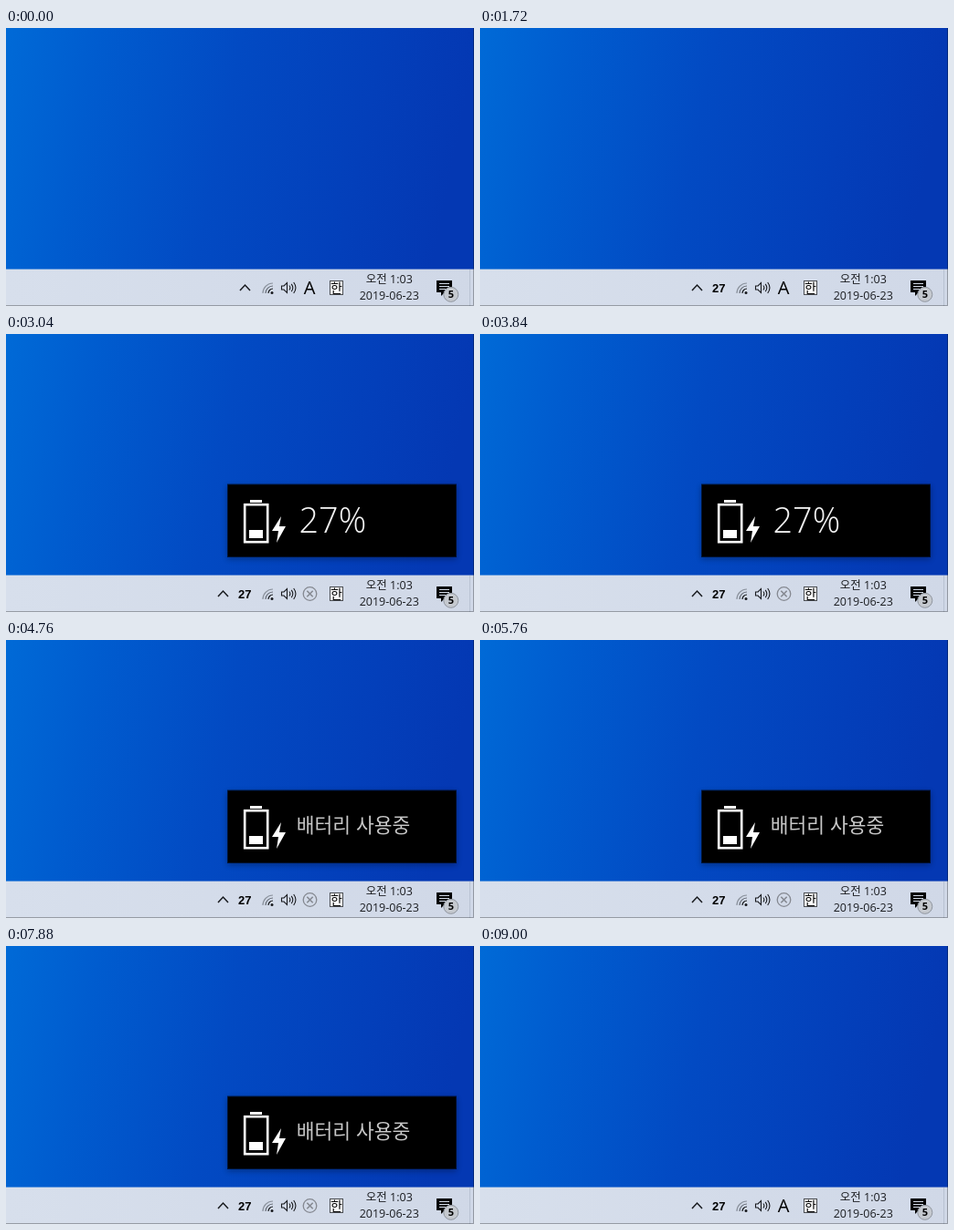
Recreate the animation shown at these times as an HTML page. Size 512 by 305 pixels, loop 9040 ms.

```html
<!DOCTYPE html>
<html lang="ko">
<head>
<meta charset="utf-8">
<title>Battery notice</title>
<style>
html, body { margin: 0; height: 100%; overflow: hidden; }
svg { display: block; width: 100vw; height: 100vh; }
text { font-family: "Open Sans", "Noto Sans CJK KR", "Noto Sans CJK", sans-serif; }
.ko { font-family: "Noto Sans CJK KR", "Noto Sans CJK", sans-serif; }
.line { fill: none; stroke: #181a1e; }
</style>
</head>
<body>
<svg viewBox="0 0 512 305" preserveAspectRatio="none">
  <defs>
    <linearGradient id="sky" x1="0" y1="0" x2="1" y2="0.12">
      <stop offset="0" stop-color="#006ad7"/>
      <stop offset=".2" stop-color="#005ccf"/>
      <stop offset=".5" stop-color="#024ac3"/>
      <stop offset=".8" stop-color="#033fba"/>
      <stop offset="1" stop-color="#0438b3"/>
    </linearGradient>
    <linearGradient id="bar">
      <stop offset="0" stop-color="#d7dfec"/>
      <stop offset="1" stop-color="#d0d8e7"/>
    </linearGradient>
    <filter id="soft" x="-10%" y="-20%" width="120%" height="140%">
      <feGaussianBlur stdDeviation="3"/>
    </filter>
  </defs>
  <rect width="512" height="305" fill="url(#sky)"/>

  <g id="popup">
    <rect x="242" y="167" width="251" height="80" opacity=".3" filter="url(#soft)"/>
    <rect x="242" y="164.5" width="251" height="80.5" opacity=".65"/>
    <rect x="243" y="165.5" width="249" height="78.5"/>
    <g fill="#fff">
      <rect x="261.2" y="187.2" width="25" height="41" fill="none" stroke="#fff" stroke-width="2.6"/>
      <rect x="267" y="182" width="13" height="3"/>
      <rect x="266" y="215" width="15" height="9"/>
      <path d="M301 200L291 216H298L296 229L306 211H299Z"/>
    </g>
    <text id="level" x="320.5" y="217.6" font-size="37.8" font-weight="350" fill="#f2f2f2">27%</text>
    <text id="usage" class="ko" x="317.7" y="211" font-size="21.5" font-weight="300" fill="#c8c8c8">배터리 사용중</text>
  </g>

  <rect y="264.6" width="512" height="40.4" fill="url(#bar)"/>
  <path d="M507.5 265V305" stroke="#b9c2d2"/>
  <path d="M511.5 0V304.5H0" fill="none" stroke="#000" opacity=".3"/>

  <path id="chevron" class="line" d="M256 288L261.5 282L267 288" stroke-width="1.5"/>
  <text id="count" x="261.2" y="290" text-anchor="middle" font-size="13" font-weight="700"
    style="font-family:'Liberation Sans',sans-serif">27</text>

  <g class="line" stroke-width="1.2">
    <path d="M281 291A11 11 0 0 1 292 280" style="stroke:#8d949f"/>
    <path d="M284 291A8 8 0 0 1 292 283" style="stroke:#666c76"/>
    <path d="M287 291A5 5 0 0 1 292 286"/>
    <circle cx="291" cy="290.5" r="1.5" fill="#181a1e" stroke="none"/>
  </g>
  <g class="line" stroke-width="1.1">
    <path d="M301.5 283H304L307.5 279.5V290.5L304 287H301.5Z"/>
    <path d="M309.8 282.5Q312 285 309.8 287.5M312.2 280.8Q315.4 285 312.2 289.2M314.7 279Q319.2 285 314.7 291"/>
  </g>

  <text id="latin" x="332" y="291.8" text-anchor="middle" font-size="20">A</text>
  <g id="off" fill="none" stroke="#858991" stroke-width="1.3">
    <circle cx="332.5" cy="285" r="7.3"/>
    <path d="M329.3 281.8L335.7 288.2M335.7 281.8L329.3 288.2" stroke-width="1.6"/>
  </g>
  <rect x="354.5" y="277.5" width="14" height="15" fill="#fff" stroke="#4a4d52"/>
  <text class="ko" x="361.5" y="290" text-anchor="middle" font-size="14" font-weight="500">한</text>

  <g text-anchor="middle" font-size="12.5" fill="#1c1e22">
    <text x="419.3" y="279.6">오전 1:03</text>
    <text x="419.3" y="297.6">2019-06-23</text>
  </g>

  <path d="M471 277H488V290H480L476 294V290H471Z"/>
  <path d="M474 280.5H485M474 283.5H485M474 286.5H481" stroke="#d5ddea"/>
  <circle cx="486.8" cy="292.3" r="8" fill="#c5c9cf" stroke="#8f959e"/>
  <text x="486.8" y="296.3" text-anchor="middle" font-size="11" font-weight="700">5</text>
</svg>
<script>
const LOOP = 9040, FRAME = 40;
const $ = id => document.getElementById(id);
const show = (id, alpha) => $(id).setAttribute('opacity', Number(alpha));
const ramp = (t, start, length) => Math.max(0, Math.min(1, (t - start) / length));

function draw(now) {
  const t = Math.floor(now % LOOP / FRAME) * FRAME;
  const tray = t >= 1000;
  const busy = t >= 2000 && t < 8400;
  const second = t >= 4200;
  show('popup', ramp(t, 1960, 160) - ramp(t, 8320, 160));
  show('level', !second);
  show('usage', second);
  show('count', tray);
  show('off', busy);
  show('latin', !busy);
  $('chevron').setAttribute('transform', `translate(${tray ? -24 : 0} 0)`);
}

const start = performance.now();
function tick() {
  draw(performance.now() - start);
  requestAnimationFrame(tick);
}
tick();
</script>
</body>
</html>
```
